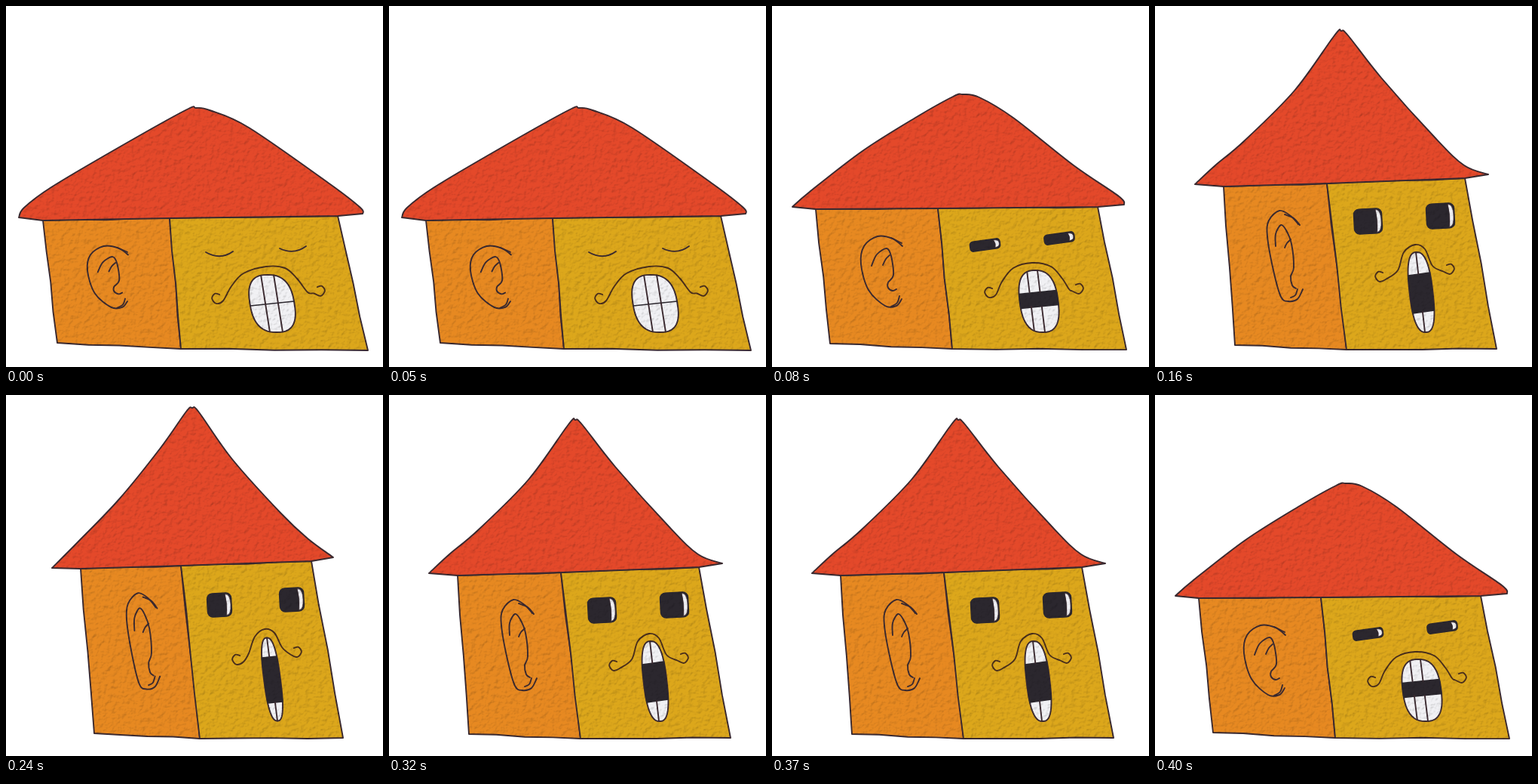
Animation of 500x478 px, one loop 480 ms. Source, as an HTML page:

```html
<!DOCTYPE html>
<html lang="en">
<head>
<meta charset="utf-8">
<title>Singing house</title>
<style>
html, body { margin: 0; width: 100%; height: 100%; overflow: hidden; background: #fff; }
svg { display: block; width: 100%; height: 100%; }
path, rect { fill: none; stroke: #3b2a30; stroke-width: 1.9; stroke-linecap: round; stroke-linejoin: round; vector-effect: non-scaling-stroke; }
.roof { fill: #e2482a; }
.side { fill: #e58821; }
.front { fill: #daa51b; }
.teeth { fill: #efeff2; }
.dark { fill: #2b272e; stroke: #2b272e; stroke-width: 1.5; }
.white { fill: #efeff2; stroke-width: .7; }
.hair { stroke: #4a2f1c; }
</style>
</head>
<body>
<svg viewBox="0 0 500 478">
  <filter id="paper" x="0" y="0" width="500" height="478" filterUnits="userSpaceOnUse" color-interpolation-filters="sRGB">
    <feTurbulence type="fractalNoise" baseFrequency=".16" numOctaves="3" seed="4"/>
    <feDiffuseLighting surfaceScale=".7" diffuseConstant="1.12" lighting-color="#fff" result="light">
      <feDistantLight azimuth="235" elevation="62"/>
    </feDiffuseLighting>
    <feComposite in="SourceGraphic" in2="light" operator="arithmetic" k1="1.01"/>
  </filter>
</svg>
<script>
const svg = document.querySelector('svg');

function add(parent, tag, attrs) {
  const el = document.createElementNS(svg.namespaceURI, tag);
  for (const k in attrs) el.setAttribute(k, attrs[k]);
  return parent.appendChild(el);
}

function pairs(v) {
  const out = [];
  for (let i = 0; i < v.length; i += 2) out.push([v[i], v[i + 1]]);
  return out;
}

// Open Catmull-Rom curve
function curve(pts) {
  const at = i => pts[Math.max(0, Math.min(pts.length - 1, i))];
  let d = 'M' + pts[0];
  for (let i = 0; i < pts.length - 1; i++) {
    const [a, b, c, e] = [i - 1, i, i + 1, i + 2].map(at);
    d += 'C' + [0, 1].map(k => b[k] + (c[k] - a[k]) / 6) +
      ' ' + [0, 1].map(k => c[k] - (e[k] - b[k]) / 6) + ' ' + c;
  }
  return d;
}

// Polygon whose edges wobble a little, as if inked by hand
function wall(corners) {
  const pts = corners.flatMap((a, i) => {
    const b = corners[(i + 1) % corners.length];
    return [0, .25, .5, .75].map(t => [0, 1].map(k =>
      a[k] + (b[k] - a[k]) * t + (t && .8 * Math.sin(a[0] + b[0] + 9 * t + k))));
  });
  return 'M' + pts.join('L') + 'Z';
}

// Half a turn and more around a curl of the moustache, from the inside out
function curl(x, y, dir) {
  return [0, 1, 2, 3, 4].map(k => {
    const a = -(50 + 70 * k) * Math.PI / 180, r = 5 + k;
    return [x + dir * r * Math.cos(a), y + r * Math.sin(a)];
  });
}

const wideEar = [
  [173, 318, 160, 308, 140, 305, 122, 318, 118, 342, 128, 376, 150, 397, 165, 397, 172, 388],
  [158, 307, 172, 314],
  [158, 398, 166, 393, 169, 384],
  [132, 344, 139, 329, 152, 321, 158, 331, 161, 356, 154, 366, 154, 373, 160, 377, 165, 375],
  [156, 330, 151, 335, 147, 343]
];
const slimEar = [
  [190, 289, 180, 278, 165, 271, 151, 284, 149, 305, 157, 350, 167, 385, 177, 391, 189, 388, 196, 375],
  [172, 276, 184, 281, 192, 290],
  [180, 386, 186, 383, 189, 375],
  [160, 318, 160, 302, 167, 290, 174, 297, 181, 315, 184, 346, 180, 358, 182, 370, 187, 374],
  [180, 309, 175, 314, 172, 320]
];

function mouth(draw, { cx, cy, w, h, lean, band, tilt, gaps }) {
  const n = 2.6;
  const rim = u => (1 - Math.min(1, Math.abs(u)) ** n) ** (1 / n);
  const at = (v, dx) => [cx + lean * v + dx, cy + h * v];
  const bend = c => Math.sign(c) * Math.abs(c) ** (2 / n);
  const pts = Array.from({ length: 60 }, (_, i) => {
    const a = i * Math.PI / 30;
    return at(bend(Math.sin(a)), w * bend(Math.cos(a)));
  });
  draw('teeth', 'M' + pts.join('L') + 'Z');

  const edge = (y, side) => {
    const v = (y - side * tilt - cy) / h;
    return at(v, side * w * rim(v));
  };
  const [top, low] = band;
  draw('dark', 'M' + [edge(top, -1), edge(top, 1), edge(low, 1), edge(low, -1)].join('L') + 'Z');
  for (const dx of gaps) {
    const end = rim(dx / w);
    draw('', 'M' + at(-end, dx) + 'L' + at((top - cy) / h, dx));
    draw('', 'M' + at((low - cy) / h, dx) + 'L' + at(end, dx));
  }
}

function eye(g, draw, x, y, [w, h, turn]) {
  const transform = `translate(${x} ${y}) rotate(${turn})`;
  add(g, 'rect', { class: 'dark', x: -w / 2, y: -h / 2, width: w, height: h, rx: Math.min(7, h / 3), transform });
  const r = w / 2 - 1, t = h / 2 - 1.5;
  draw('white', `M${r - 7} ${-t}Q${r} ${-t} ${r} 0Q${r} ${t} ${r - 6} ${t}Q${r - 4} 0 ${r - 7} ${-t}Z`, transform);
}

function house(p) {
  const g = add(svg, 'g', { filter: 'url(#paper)', display: 'none' });
  const draw = (cls, d, transform = '') => add(g, 'path', { class: cls, d, transform });
  const [tl, tm, tr] = pairs(p.eaves), [bl, bm, br] = pairs(p.floor);

  draw('side', wall([tl, bl, bm, tm]));
  draw('front', wall([tm, bm, br, tr]));
  draw('roof', curve(pairs(p.roof)) + 'L' + [tr, tm, tl].join('L') + 'Z');
  for (const s of p.ear) draw('', curve(pairs(s)), p.fit);
  if (p.lids) draw('', p.lids);
  else for (const [x, y] of pairs(p.eyes)) eye(g, draw, x, y, p.eyeSize);

  const [left, right] = pairs(p.curls);
  draw('hair', curve([...curl(...left, 1), ...pairs(p.lip), ...curl(...right, -1).reverse()]));
  mouth(draw, p.mouth);
  return g;
}

const squat = house({
  roof: [17, 280, 24, 267, 60, 240, 150, 187, 238, 138, 252, 135, 270, 138, 322, 161, 430, 236, 470, 267, 473, 275],
  eaves: [49, 284, 217, 281, 440, 278],
  floor: [68, 446, 232, 454, 480, 456],
  ear: wideEar, fit: 'matrix(.98 0 0 .88 -7.6 49.6)',
  lids: 'M265 326Q284 337 301 325M363 321Q382 330 398 318',
  curls: [280, 386, 416, 376],
  lip: [299, 371, 315, 354, 345, 345, 370, 347, 386, 361, 400, 379],
  mouth: { cx: 353, cy: 394, w: 29.5, h: 38, lean: 6, band: [394, 394], tilt: 3, gaps: [-9, 8] }
});

const low = house({
  roof: [27, 266, 50, 246, 120, 192, 190, 148, 240, 120, 253, 117, 275, 121, 320, 148, 400, 211, 460, 252, 467, 263],
  eaves: [58, 269, 220, 268, 432, 266],
  floor: [77, 447, 239, 454, 470, 455],
  ear: wideEar,
  eyes: [282.5, 316.5, 381, 307.5], eyeSize: [40, 13, -8],
  curls: [289, 378, 406, 373],
  lip: [305, 365, 320, 347, 345, 340, 370, 345, 385, 361, 394, 375],
  mouth: { cx: 354, cy: 391, w: 25.5, h: 41, lean: 5, band: [379, 398], tilt: 2.5, gaps: [-11, 3] }
});

const tall = house({
  roof: [53, 236, 80, 211, 118, 179, 185, 112, 238, 39, 247, 33, 256, 39, 300, 95, 372, 175, 410, 211, 442, 223],
  eaves: [91, 239, 228, 235, 411, 228],
  floor: [106, 449, 254, 455, 453, 454],
  ear: slimEar,
  eyes: [282.5, 285, 378.5, 278], eyeSize: [37, 33, -3],
  curls: [299, 357, 390, 347],
  lip: [322, 350, 330, 326, 345, 316, 358, 322, 368, 344],
  mouth: { cx: 353, cy: 379, w: 15.5, h: 53, lean: 6, band: [355, 405], tilt: 2, gaps: [-1] }
});

const tallest = house({
  roof: [61, 229, 95, 195, 150, 138, 205, 70, 239, 22, 247, 17, 256, 23, 300, 85, 365, 157, 400, 190, 434, 215],
  eaves: [99, 230, 232, 226, 405, 220],
  floor: [117, 448, 257, 455, 447, 454],
  ear: slimEar, fit: 'matrix(.94 0 0 1.06 20 -25)',
  eyes: [283, 278, 379, 271], eyeSize: [32, 31, -3],
  curls: [307, 349, 385, 339],
  lip: [322, 342, 330, 320, 343, 310, 356, 315, 366, 334],
  mouth: { cx: 353, cy: 376.5, w: 11, h: 55, lean: 7, band: [347, 407], tilt: 1, gaps: [0] }
});

// The house stretches up and sinks back in held poses
const order = [squat, low, tall, tallest, tall, low];
let shown;

function tick() {
  const pose = order[Math.floor(performance.now() / 80) % order.length];
  if (pose !== shown) {
    if (shown) shown.setAttribute('display', 'none');
    pose.setAttribute('display', 'inline');
    shown = pose;
  }
  requestAnimationFrame(tick);
}
tick();
</script>
</body>
</html>
```
